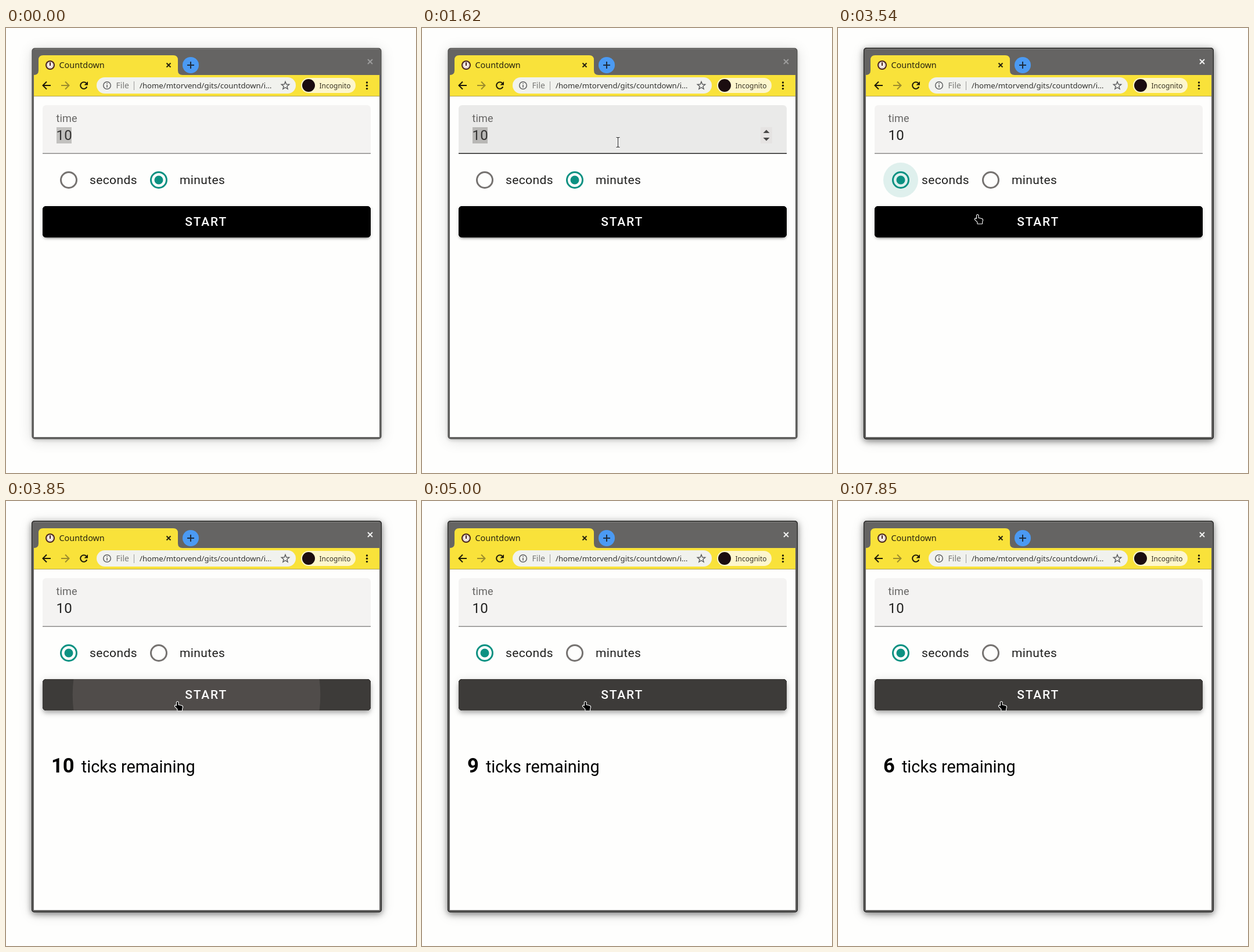
An HTML page with a canvas that plays this animation: 706 by 767 pixels, repeating every 8000 ms.

```html
<!DOCTYPE html>
<html lang="en">
<head>
<meta charset="utf-8">
<title>Countdown</title>
<style>
html, body { margin: 0; width: 100%; height: 100%; overflow: hidden; background: #fefefd; }
canvas { display: block; }
</style>
</head>
<body>
<canvas id="stage" width="706" height="767"></canvas>
<script>
const LOOP = 8000, TICK = 77;
const ctx = document.getElementById('stage').getContext('2d');
const PAGE = '#fefefd', YELLOW = '#f9e23a', TEAL = '#0c9182', GREY = '#757270', INK = '#1f1f1e';
const UI = '"Noto Sans", sans-serif', BODY = 'Roboto, sans-serif';

// Pointer stops: time, x, y. Each holds until the next.
const STOPS = [
  [380, 84, 28], [460, 95, 80], [540, 125, 97], [620, 158, 63],
  [770, 185, 75], [850, 215, 108], [920, 245, 160], [1000, 275, 222],
  [1080, 300, 262], [1150, 318, 275], [1230, 330, 268], [1310, 334, 250],
  [1380, 335, 236], [1460, 336, 226], [1620, 337.5, 197],
  [2540, 230, 180], [2620, 106, 163], [2690, 170, 248], [2850, 221, 269],
  [3000, 221, 269], [3080, 226, 295], [3150, 235, 321],
  [3620, 258, 331], [3690, 278, 340], [3770, 290, 345],
  [4620, 286, 345], [5000, 276, 345]
];

// Progress 0..1 in n held steps from a start time.
const stepped = (t, start, n) =>
  t < start ? 0 : Math.min(1, (Math.floor((t - start) / TICK) + 1) / n);
const mix = (a, b, p) => a + (b - a) * p;

function box(x, y, w, h, r, fill) {
  ctx.beginPath();
  ctx.roundRect(x, y, w, h, r);
  ctx.fillStyle = fill;
  ctx.fill();
}

function disc(x, y, r, fill) {
  ctx.beginPath();
  ctx.arc(x, y, r, 0, Math.PI * 2);
  ctx.fillStyle = fill;
  ctx.fill();
}

function ring(x, y, r, width, color) {
  ctx.beginPath();
  ctx.arc(x, y, r, 0, Math.PI * 2);
  ctx.lineWidth = width;
  ctx.strokeStyle = color;
  ctx.stroke();
}

function stroke(path, color, width) {
  ctx.strokeStyle = color;
  ctx.lineWidth = width;
  ctx.stroke(new Path2D(path));
}

function fill(path, color) {
  ctx.fillStyle = color;
  ctx.fill(new Path2D(path));
}

function text(str, x, y, font, color, spacing = 0) {
  ctx.font = font;
  ctx.letterSpacing = spacing + 'px';
  ctx.fillStyle = color;
  ctx.fillText(str, x, y);
}

function shadow(x, y, w, h, r, dy, blur, spread, alpha) {
  if (!alpha) return;
  ctx.save();
  ctx.shadowColor = `rgba(0,0,0,${alpha})`;
  ctx.shadowBlur = blur;
  ctx.shadowOffsetY = dy;
  box(x - spread, y - spread, w + 2 * spread, h + 2 * spread, r, '#000');
  ctx.restore();
}

function drawCross(x, y, s, color, width) {
  stroke(`M${x - s} ${y - s}L${x + s} ${y + s}M${x + s} ${y - s}L${x - s} ${y + s}`, color, width);
}

function drawArrow(x, dir, color) {
  const tip = x + 6.5 * dir;
  stroke(`M${x - 7 * dir} 99H${tip}M${x} 92.5L${tip} 99L${x} 105.5`, color, 2);
}

function drawFrame(t) {
  const active = stepped(t, 1770, 3);
  const win = [45, 35, 601, 673, 5];
  shadow(...win, 3, 24, 0, 0.14);
  shadow(...win, 2, 6, 0, 0.2 * (1 - active));
  shadow(...win, 3, 11, 1, 0.48 * active);
  box(44.5, 34.5, 602, 674, 5, '#454443');
  box(45.5, 35.5, 600, 672, 4, '#656463');
  ctx.fillStyle = '#7b7a79';
  ctx.fillRect(49, 36, 593, 1);
  const shade = Math.round(mix(156, 242, active));
  drawCross(627, 58, 4, `rgb(${shade},${shade},${shade})`, 2);
  ctx.fillStyle = PAGE;
  ctx.fillRect(48, 118, 595, 587);
}

function drawTabs() {
  fill('M48 81Q56 81 56 73V55Q56 47 64 47H288Q296 47 296 55V73Q296 81 304 81Z', YELLOW);
  disc(76, 64, 8, '#46211c');
  disc(76, 64, 6, '#f3e9e4');
  stroke('M76 59V65', '#46211c', 2);
  for (let i = 0; i < 8; i++) {
    const a = i * Math.PI / 4;
    disc(76 + 4.6 * Math.cos(a), 64 + 4.6 * Math.sin(a), 0.5, '#8a6a62');
  }
  text('Countdown', 91.5, 69, '14.4px ' + UI, '#26220f');
  drawCross(280, 64, 3.5, '#26220f', 2);
  disc(318, 64, 14, '#4b9af3');
  stroke('M312 64H324M318 58V70', '#1e2c3e', 2);
}

function drawToolbar() {
  ctx.fillStyle = YELLOW;
  ctx.fillRect(48, 81, 595, 36);
  ctx.fillStyle = '#b0a458';
  ctx.fillRect(48, 117, 595, 1);
  drawArrow(70, -1, '#1d1908');
  drawArrow(102, 1, '#9c8c2c');
  ctx.beginPath();
  ctx.arc(134, 99, 5.8, 0.4, Math.PI * 1.75);
  ctx.lineWidth = 2;
  ctx.strokeStyle = '#1d1908';
  ctx.stroke();
  fill('M141 92V98.5H134.5Z', '#1d1908');

  box(156, 85, 343, 28, 14, '#f1f2ee');
  ring(174, 99, 6.3, 1.5, '#5f6062');
  stroke('M174 98V102.5M174 95V96.6', '#5f6062', 1.6);
  text('File', 189.5, 104, '14px ' + UI, '#797977');
  ctx.fillStyle = '#9c9c9a';
  ctx.fillRect(220, 92, 1, 15);
  text('/home/mtorvend/gits/countdown/i…', 230, 104, '13.2px ' + UI, '#333331');

  ctx.beginPath();
  for (let i = 0; i < 10; i++) {
    const r = i % 2 ? 3 : 7, a = i * Math.PI / 5 - Math.PI / 2;
    ctx.lineTo(481 + r * Math.cos(a), 99.5 + r * Math.sin(a));
  }
  ctx.closePath();
  ctx.lineWidth = 1.4;
  ctx.strokeStyle = '#5a5b5d';
  ctx.stroke();

  box(508, 86, 94, 26, 13, '#fdf6cd');
  disc(521, 99, 11, '#1b0d10');
  text('Incognito', 539.5, 104, '12px ' + UI, '#3a3524');
  for (const y of [94, 99.3, 104.6]) disc(621.5, y, 1.7, '#1d1908');
}

function drawField(t, beam) {
  const focus = t >= 1770 && t < 3000;
  const hover = beam || (t >= 1460 && t < 3000);
  const line = stepped(t, 1770, 3), fade = 1 - stepped(t, 3000, 3);
  box(63, 133, 565, 84, [6, 6, 0, 0], '#f4f3f2');
  const tint = hover ? 1 : t >= 3000 ? fade : 0;
  if (tint) box(63, 133, 565, 84, [6, 6, 0, 0], `rgba(0,0,0,${0.041 * tint})`);

  ctx.fillStyle = beam || focus ? '#252524' : '#8d8c8b';
  ctx.fillRect(63, 215.5, 565, 1.5);
  if (line && fade) {
    const left = mix(337, 63, line), right = mix(337, 628, line);
    ctx.fillStyle = `rgba(0,0,0,${fade})`;
    ctx.fillRect(left, 214, right - left, 3);
  }

  if (t < 1770) {
    ctx.fillStyle = hover ? '#b8b7b5' : '#c2c1bf';
    ctx.fillRect(87, 171, 26, 28);
  }
  text('time', 86.5, 162, '18px ' + BODY, focus ? '#000' : '#666564', 0.17);
  text('10', 86.5, 193, '24px ' + BODY, t < 1770 ? '#343332' : '#232322', 0.22);
  if (t >= 1770 && t < 2460) {
    ctx.fillStyle = '#000';
    ctx.fillRect(113, 171, 1.5, 28);
  }
  if (beam || focus) {
    ctx.fillStyle = '#e5e3e2';
    ctx.fillRect(583, 171, 20, 28);
    fill('M587.5 181L593 175.5L598.5 181ZM587.5 189L593 194.5L598.5 189Z', '#484746');
  }
}

function drawRadio(x, on) {
  ring(x, 262, 13.5, 3, on ? mixColor(on) : GREY);
  if (on) disc(x, 262, 7.5 * on, TEAL);
}

const mixColor = on => (on > 0.4 ? TEAL : GREY);

function drawRadios(t) {
  const swap = stepped(t, 3000, 2);
  const glow = stepped(t, 3000, 3), gone = stepped(t, 3770, 2);
  if (glow && gone < 1) {
    disc(108, 262, mix(18, 30, glow), `rgba(12,145,130,${0.125 * (1 - gone)})`);
  }
  drawRadio(108, swap);
  drawRadio(263, 1 - swap);
  text('seconds', 144, 269, '21px ' + BODY, INK, 0.375);
  text('minutes', 299, 269, '21px ' + BODY, INK, 0.375);
}

function drawButton(t) {
  const rect = [63, 307, 565, 54, 6];
  if (t < 3620) {
    shadow(...rect, 4.5, 1.5, -3, 0.2);
    shadow(...rect, 3, 3, 0, 0.14);
    shadow(...rect, 1.5, 7.5, 0, 0.12);
  } else {
    shadow(...rect, 3, 6, -1.5, 0.2);
    shadow(...rect, 6, 7.5, 0, 0.14);
    shadow(...rect, 1.5, 15, 0, 0.12);
  }
  box(...rect, '#000');
  const focus = stepped(t, 3770, 2);
  if (focus) box(...rect, `rgba(61,59,57,${focus})`);
  if (t >= 3770 && t < 4150) {
    ctx.save();
    ctx.clip();
    disc(mix(294, 345, stepped(t, 3770, 3)), 334, mix(0, 320, stepped(t, 3770, 3)), '#504c4a');
    ctx.restore();
  }
  text('START', 308.3, 341, '500 21px ' + BODY, '#fff', 1.875);
}

function drawCounter(t) {
  if (t < 3850) return;
  const left = String(10 - Math.floor((t - 3850) / 1000));
  text(left, 78, 468, 'bold 34.56px ' + BODY, '#000');
  text('ticks remaining', 90 + 19.9 * left.length, 468, '28.8px ' + BODY, '#000');
}

const SHAPES = {
  arrow: 'M.8 1V17.5L4.6 14L7.2 20L9.8 18.9L7.2 13H12.2Z',
  hand: 'M4 2Q5.2 .2 6.5 2V6.5L12.5 8Q14.3 8.6 14 10.5L13 13.5V16.2H5.5V13.5L1 9Q.6 7.2 2.4 7.4L4 8.6Z'
};

function drawPointer(kind, x, y) {
  ctx.save();
  ctx.translate(x, y);
  if (kind === 'beam') {
    const d = 'M-3 -8.5H-1L0 -7.5L1 -8.5H3M0 -7.5V7.5M-3 8.5H-1L0 7.5L1 8.5H3';
    stroke(d, '#fff', 3);
    stroke(d, '#222', 1.1);
  } else {
    ctx.lineJoin = 'round';
    stroke(SHAPES[kind], '#fff', 2.2);
    fill(SHAPES[kind], '#000');
  }
  ctx.restore();
}

function pointerKind(t, x, y) {
  if (t >= 3460) return 'hand';
  return y > 133 && y < 217 && x > 63 ? 'beam' : 'arrow';
}

function draw(t) {
  const stop = STOPS.findLast(s => s[0] <= t);
  const kind = stop && pointerKind(t, stop[1], stop[2]);
  ctx.fillStyle = PAGE;
  ctx.fillRect(0, 0, 706, 767);
  drawFrame(t);
  drawToolbar();
  drawTabs();
  drawField(t, kind === 'beam');
  drawRadios(t);
  drawButton(t);
  drawCounter(t);
  if (stop) drawPointer(kind, stop[1], stop[2]);
}

const begin = performance.now();
function loop() {
  draw((performance.now() - begin) % LOOP);
  requestAnimationFrame(loop);
}
loop();
</script>
</body>
</html>
```
